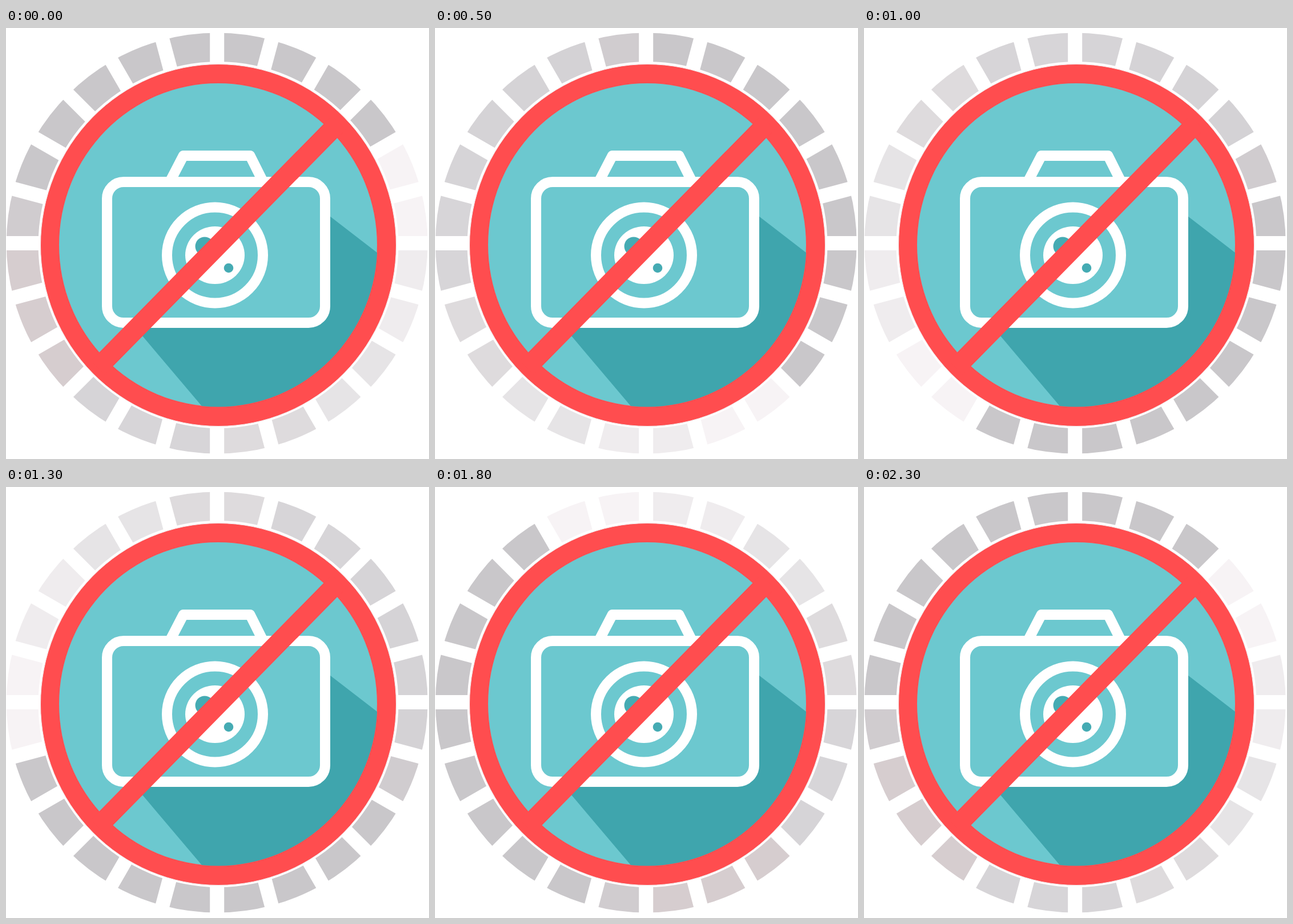
An HTML page for the animation above (2.4 s loop, 741 by 756 pixels).

```html
<!DOCTYPE html>
<html lang="en">
<head>
<meta charset="utf-8">
<title>No photography</title>
<style>
  html, body { margin: 0; width: 100%; height: 100%; overflow: hidden; background: #fff; }
  svg { display: block; width: 741px; height: 756px; }
</style>
</head>
<body>
<svg viewBox="0 0 741 756">
  <clipPath id="disc"><ellipse cx="371.5" cy="380.5" rx="279" ry="284"/></clipPath>
  <g id="ring"></g>
  <g id="gaps" stroke="#fff" stroke-width="25"></g>

  <ellipse cx="372" cy="380.5" rx="315.5" ry="321.5" fill="#fff"/>
  <ellipse cx="372" cy="381" rx="311.5" ry="317.5" fill="#ff4d4f" stroke="#f3e4e6"/>
  <ellipse cx="371.5" cy="380.5" rx="278.5" ry="283.5" fill="#6cc8cf"/>
  <path d="M560 324.6L720 448V720H391L227 526V500H560Z" fill="#3fa5ad" clip-path="url(#disc)"/>

  <g fill="#6cc8cf" stroke="#fff" stroke-width="18" stroke-linejoin="round">
    <path d="M288.9 266L310.7 224H427.5L448.5 266"/>
    <rect x="177" y="270" width="382" height="247" rx="29"/>
    <circle cx="366" cy="398.5" r="84"/>
  </g>
  <ellipse cx="366" cy="398.5" rx="52" ry="50.5" fill="#fff"/>
  <g fill="#45abb3">
    <circle cx="348" cy="383" r="16.5"/>
    <circle cx="390" cy="421" r="8.3"/>
  </g>
  <path d="M583 165.7L160.5 596.3" stroke="#ff4d4f" stroke-width="34.3"/>
</svg>
<script>
const COUNT = 24, STEP = 100, CX = 369.7, CY = 377.6, R = 369;
const GREY = '#c9c7ca', WARM = '#d6cdcf';
// Trail shades, from the brightest segment clockwise; the rest stay grey.
const trail = ['#f7f3f5', '#f7f3f5', '#efecee', '#efecee', '#e6e4e6', '#e6e4e6', '#dedbdd', '#dedbdd',
  '#d7d5d8', '#d7d5d8', '#d6d4d7', '#d5d3d6', '#d5d3d6', '#d4d2d5', '#d0cccf'];

function add(parent, d) {
  const path = document.createElementNS('http://www.w3.org/2000/svg', 'path');
  path.setAttribute('d', d);
  return document.getElementById(parent).appendChild(path);
}

function rim(i, r) {
  const a = i * 2 * Math.PI / COUNT;
  return `${CX + r * Math.sin(a)} ${CY - r * Math.cos(a)}`;
}

const segments = [];
for (let i = 0; i < COUNT; i++) {
  segments.push(add('ring', `M${CX} ${CY}L${rim(i, R)}A${R} ${R} 0 0 1 ${rim(i + 1, R)}Z`));
  add('gaps', `M${CX} ${CY}L${rim(i, R + 5)}`);
}

function draw(now) {
  const step = Math.floor(now / STEP) % COUNT;
  const warm = step < 5 || step > 15;
  segments.forEach((segment, i) => {
    const lag = (i - step - 4 + 2 * COUNT) % COUNT;
    const tinted = warm && lag > 10 && lag < 14;
    segment.setAttribute('fill', tinted ? WARM : trail[lag] || GREY);
  });
}

const start = performance.now();
function tick() {
  draw(performance.now() - start);
  requestAnimationFrame(tick);
}
tick();
</script>
</body>
</html>
```
